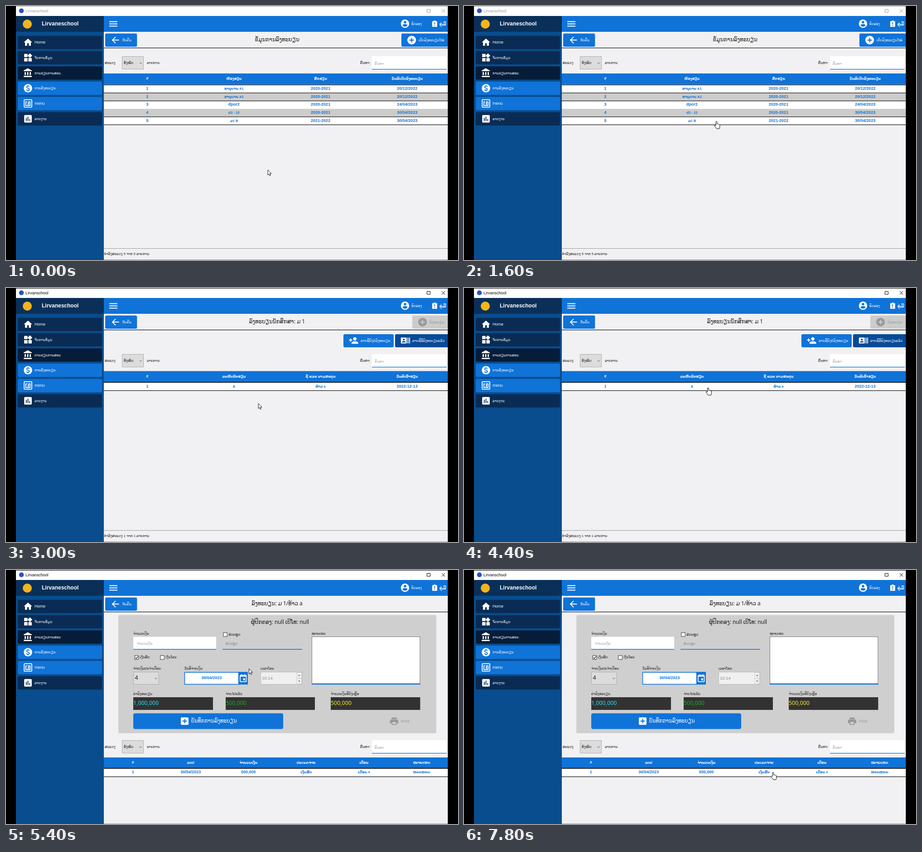
Write an HTML page that moves like this. It is 998 px wide and 561 px high and loops after 8000 ms.

```html
<!DOCTYPE html>
<html lang="lo">
<head>
<meta charset="utf-8">
<title>Lirvanschool</title>
<style>
html, body { margin: 0; width: 100%; height: 100%; overflow: hidden; background: #000; }
svg { display: block; width: 998px; height: 561px; }
text { font-family: "Liberation Sans", "DejaVu Sans", sans-serif; white-space: pre; }
.big { font-family: "Noto Sans", "DejaVu Sans", sans-serif; }
</style>
</head>
<body>
<svg id="stage" viewBox="0 0 998 561"></svg>
<script>
const BLUE = '#1073d8', PAGE = '#f1f1f3', INK = '#1a1a1a', GREY = '#cccccc', HINT = '#a0a0a0';

const rect = (x, y, x2, y2, fill, r = 0, extra = '') =>
  `<rect x="${x}" y="${y}" width="${x2 - x}" height="${y2 - y}" rx="${r}" fill="${fill}" ${extra}/>`;
const frame = (x, y, x2, y2, fill, line, w = 1) =>
  rect(x + w / 2, y + w / 2, x2 - w / 2, y2 - w / 2, fill, 0, `stroke="${line}" stroke-width="${w}"`);
const path = (d, fill, line = 'none', w = 1, extra = '') =>
  `<path d="${d}" fill="${fill}" stroke="${line}" stroke-width="${w}" ${extra}/>`;
const disc = (x, y, r, fill) => `<circle cx="${x}" cy="${y}" r="${r}" fill="${fill}"/>`;
const group = (id, body) => `<g id="${id}">${body}</g>`;
// 24-unit icon centred on x, y
const icon = (x, y, k, body) =>
  `<g transform="translate(${x - 12 * k} ${y - 12 * k}) scale(${k})">${body}</g>`;

const text = (x, y, s, fill = INK, { size, bold, mid, big } = {}) => {
  const lao = /[\u0e80-\u0eff]/.test(s);
  size = size || (big ? (lao ? 11.9 : 12.4) : lao ? 7.5 : 9);
  return `<text x="${x}" y="${y}" font-size="${size}" fill="${fill}"` +
    (bold ? ' font-weight="700"' : '') + (mid ? ' text-anchor="middle"' : '') +
    (big ? ' class="big"' : '') + `>${s}</text>`;
};

const plus = (x, y, r, color) =>
  path(`M${x - r} ${y}h${2 * r}M${x} ${y - r}v${2 * r}`, 'none', color, 2.2);
const chevron = (x, y) => path(`M${x - 2.5} ${y - 1.2}l2.5 2.5l2.5-2.5`, 'none', '#444', 1);

const ICONS = {
  home: path('M10 20v-6h4v6h5v-8h3L12 3 2 12h3v8z', '#fff'),
  widgets: path('M13 13v8h8v-8zM3 21h8v-8H3zM3 3v8h8V3zM16.7 1.7 11 7.3 16.7 13l5.6-5.7z', '#fff'),
  bank: path('M4 10v7h3v-7zm6 0v7h3v-7zM2 22h19v-3H2zm14-12v7h3v-7zM11.5 1 2 6v2h19V6z', '#fff'),
  money: disc(12, 12, 10, '#fff') +
    path('M15.3 8.8Q14.6 7 12 7Q9 7 9 9.3Q9 11.2 12 12Q15.3 12.8 15.3 14.8Q15.3 17 12 17Q9 17 8.7 15M12 4.8V7M12 17v2.2', 'none', BLUE, 1.9),
  nfc: rect(3, 3, 21, 21, 'none', 1.5, 'stroke="#fff" stroke-width="2"') +
    path('M10 8H7v9h10V8h-4v5.5', 'none', '#fff', 2) + disc(13, 13.5, 1.7, '#fff'),
  chart: rect(3, 3, 21, 21, '#fff', 2) + path('M8 17v-7M12 17V7M16 17v-4', 'none', '#0a2c54', 2),
  user: disc(12, 12, 10, '#fff') + disc(12, 8.5, 3, BLUE) +
    path('M6 16Q6.4 13 12 13T18 16Q16 19.2 12 19.2T6 16', BLUE),
  addUser: disc(15, 8, 4, '#fff') + path('M7 20v-2q0-4 8-4t8 4v2z', '#fff') +
    path('M1 11h8M5 7v8', 'none', '#fff', 2.2),
  card: rect(1, 5, 15, 19, '#fff', 1) + disc(8, 9.7, 2.2, '#064a98') +
    path('M3.5 16.5q0-3.2 4.5-3.2t4.5 3.2z', '#064a98') + path('M18 5v14M22 5v14', 'none', '#fff', 2),
  printer: path('M6 3h12v4H6zM5 8h14q3 0 3 3v6h-4v4H6v-4H2v-6q0-3 3-3zm3 6v5h8v-5z', '#999'),
  calendar: rect(4, 4.5, 20, 21, 'none', 1, 'stroke="#fff" stroke-width="2"') +
    path('M4 6.5h16M8 2v4M16 2v4', 'none', '#fff', 3) + rect(12, 12.5, 17, 17.5, '#fff'),
};

const menu = [
  ['home', 'Home', '#0a2c54'], ['widgets', 'ຈັດການຂໍ້ມູນ', '#0a2c54'],
  ['bank', 'ການຮຽນການສອນ', '#061d3a'], ['money', 'ການລົງທະບຽນ', BLUE],
  ['nfc', 'menu', BLUE], ['chart', 'ລາຍງານ', '#0a2c54'],
];

const titleBar = (id, color) => group(id,
  rect(22, 0, 976, 1, color) + text(43, 14, 'Lirvanschool', color) +
  path('M929.5 7.5h7v6.5h-7zM962 7l7.5 7.5M969.5 7l-7.5 7.5', 'none', color, 1));

function shell() {
  let s = rect(22, 0, 976, 22, '#fff') + disc(34, 10.5, 5.3, '#2a50c8') +
    titleBar('idle', '#999') + titleBar('active', '#000') +
    rect(22, 22, 216, 561, '#094d8e') + rect(22, 22, 216, 57, '#0a3059') +
    disc(47, 40, 10, '#f2b51d') + text(79, 42.5, 'Lirvaneschool', '#fff', { size: 12, bold: true });
  menu.forEach(([name, label, fill], i) => {
    const y = 80.5 + i * 33.75;
    s += rect(26, y - 14.7, 212, y + 14.7, fill, 3) + icon(48.5, y - .2, .93, ICONS[name]) +
      text(63, y + 2.5, label, '#fff');
  });
  return s + rect(216, 22, 976, 57, BLUE) +
    path('M228 34.5h18M228 39.5h18M228 44.5h18', 'none', '#fff', 2) +
    icon(881, 39, .92, ICONS.user) + text(895, 41.5, 'ທົດລອງ', '#fff') +
    rect(941, 33.5, 952, 46, '#fff', 1) + rect(944.5, 32, 948.5, 35, '#fff', 1) +
    path('M946.5 36v4.5M946.5 42v2', 'none', BLUE, 1.7) +
    text(957, 42.5, 'ຄູ່ມື', '#fff', { size: 9.5, bold: true });
}

const heading = title => rect(216, 57, 976, 561, PAGE) +
  rect(216, 92, 976, 93.2, '#111') + rect(219, 60.7, 289.3, 90, BLUE, 3) +
  path('M249.5 75.3H235.5M242 68.3l-7 7l7 7', 'none', '#fff', 1.9) +
  text(257, 77.5, 'ກັບຄືນ', '#fff') +
  text(598.5, 78, title, INK, { big: true, mid: true });

const corner = (x, label, fill, fg) => rect(x, 60.7, 982, 90, fill, 3) +
  disc(x + 22.7, 75.3, 9.6, fg) + plus(x + 22.7, 75.3, 5, fill) + text(x + 38, 77.5, label, fg);

const filters = y => text(218, y + 17, 'ສະແດງ') + frame(256, y, 304, y + 29, '#dcdcdc', '#adadad') +
  text(260, y + 17, 'ທັງໝົດ') + chevron(297.3, y + 15) + text(311, y + 17, 'ລາຍການ') +
  text(782, y + 17, 'ຄົ້ນຫາ:') + rect(808, y, 973, y + 29, '#fff') +
  rect(808, y + 28, 973, y + 29.3, BLUE) + text(814, y + 18.5, 'ຄົ້ນຫາ', HINT);

const cells = (y, list, fill) => list.map((s, i) =>
  text(216.5 + 765 * (i + .5) / list.length, y, s, fill, { bold: true, mid: true })).join('');
const head = (y, list) => rect(216, y, 976, y + 24.5, BLUE) + cells(y + 14.2, list, '#fff');
const row = (y, list, bg, fg) => rect(216, y, 976, y + 17.6, bg) + cells(y + 10.8, list, fg);
const rule = (y, w = 1.2) => rect(216, y - w / 2, 976, y + w / 2, '#111');
const status = n => rect(216, 535, 976, 536, '#999') + rect(216, 560, 976, 561, '#999') +
  text(216.5, 550, `ກຳລັງສະແດງ ${n} ຈາກ ${n} ລາຍການ`);

function classPage() {
  const rows = [
    ['ອານຸບານ A1', '2020-2021', '20/12/2022'], ['ອານຸບານ A2', '2020-2021', '20/12/2022'],
    ['dpor2', '2020-2021', '24/04/2023'], ['ປ2 - 22', '2020-2021', '30/04/2023'],
    ['ມ1 B', '2021-2022', '30/04/2023'],
  ].map((r, i) => [String(i + 1), ...r]);
  const top = i => 174.4 + i * 17.6;
  return heading('ຂໍ້ມູນການລົງທະບຽນ') + corner(873, 'ເປີດລົງທະບຽນໃໝ່', BLUE, '#fff') + filters(111) +
    head(149, ['#', 'ຫ້ອງຮຽນ', 'ສົກຮຽນ', 'ວັນທີເປີດລົງທະບຽນ']) +
    rows.map((r, i) => row(top(i), r, i % 2 ? GREY : '#fff', BLUE)).join('') +
    group('pickClass', row(top(4), rows[4], BLUE, '#fff')) +
    [0, 1, 2, 4, 5].map(i => rule(top(i))).join('') + status(5);
}

function studentPage() {
  const student = ['1', 'a', 'ທ້າວ a', '2022-12-13'];
  return heading('ລົງທະບຽນນັກສຶກສາ: ມ 1') + corner(897, 'ລົງທະບຽນ', GREY, '#999') +
    rect(745, 102, 856, 131, BLUE, 3) + icon(767.5, 116, .92, ICONS.addUser) +
    text(783, 118.5, 'ລາຍຊື່ຍັງບໍ່ລົງທະບຽນ', '#fff') +
    rect(859, 102, 982, 131, '#064a98', 3) + icon(882, 116, .92, ICONS.card) +
    text(897, 118.5, 'ລາຍຊື່ທີ່ລົງທະບຽນແລ້ວ', '#fff') + filters(146) +
    head(183.5, ['#', 'ລະຫັດນັກຮຽນ', 'ຊື່ ແລະ ນາມສະກຸນ', 'ວັນທີເຂົ້າຮຽນ']) +
    row(208.8, student, '#fff', BLUE) +
    group('pickStudent', row(208.8, student, BLUE, '#fff') + corner(897, 'ລົງທະບຽນ', BLUE, '#fff')) +
    rule(208.3, 1.8) + rule(226.6) + status(1);
}

const check = (x, y, label, on) => frame(x, y, x + 9.5, y + 9.5, '#fff', '#333') +
  (on ? path(`M${x + 2} ${y + 4.8}l2 2.2l3.8-4.5`, 'none', '#222', 1.2) : '') +
  text(x + 12, y + 6.8, label);
const total = (x, x2, label, sum, color) => text(x, 275.5, label) +
  rect(x, 281, x2, 309, '#323233') + text(x, 298.3, sum, color, { big: true });

function payPage() {
  return heading('ລົງທະບຽນ: ມ 1/ທ້າວ a') + rect(248, 99.5, 950, 360.5, '#cfcfcf', 3) +
    text(605, 118.5, 'ຜູ້ປົກຄອງ: null ເບີໂທ: null', INK, { big: true, mid: true }) +
    text(281, 142.5, 'ຈຳນວນເງິນ') + rect(281, 147.5, 464, 176, '#fff') + rect(281, 174.5, 464, 176, BLUE) +
    text(289, 165, 'ຈຳນວນເງິນ', HINT) +
    check(479.3, 137.8, 'ສ່ວນຫຼຸດ') + rect(478, 174.5, 654, 176, BLUE) + text(485, 165, 'ສ່ວນຫຼຸດ', '#888') +
    text(675, 142.5, 'ໝາຍເຫດ') + frame(675, 147, 914.5, 253, '#fff', '#777') + rect(675, 250.5, 914.5, 253, BLUE) +
    check(283.8, 188.5, 'ເງິນສົດ', true) + check(340.3, 188.5, 'ເງິນໂອນ') +
    text(281, 219.5, 'ຈ່າຍເງິນປະຈຳເດືອນ') + frame(281, 225, 337.5, 253, '#dcdcdc', '#adadad') +
    text(284.5, 242, '4', INK, { big: true }) + chevron(331, 239.5) +
    text(394, 219.5, 'ວັນທີຈ່າຍເງິນ') + frame(393.7, 225.2, 515, 253.2, '#fff', BLUE, 1.6) +
    text(454, 241, '30/04/2023', BLUE, { bold: true, mid: true }) +
    rect(513, 225, 534, 253, BLUE) + icon(523.7, 239, .85, ICONS.calendar) +
    text(562, 219.5, 'ເວລາໂອນ') + frame(562, 225, 654, 253, '#f0f0f0', '#bdbdbd') +
    text(565, 241.5, '10:14', '#888', { size: 9.5 }) +
    frame(641.5, 226, 653, 239.5, '#f0f0f0', '#d0d0d0') + frame(641.5, 239.5, 653, 252, '#f0f0f0', '#d0d0d0') +
    path('M645 234h4.6l-2.3-2.6zM645 244.5h4.6l-2.3 2.6z', '#555') +
    total(281, 457, 'ຄ່າລົງທະບຽນ', '1,000,000', '#25dff0') +
    total(485, 682, 'ຈ່າຍໄປແລ້ວ', '500,000', '#1fae1f') +
    total(717, 914.5, 'ຈຳນວນເງິນທີ່ຍັງເຫຼືອ', '500,000', '#f5ea28') +
    rect(281, 316.5, 612, 351.2, BLUE, 4) + rect(386, 325.5, 403, 342, '#fff', 2) + plus(394.5, 333.7, 4.8, BLUE) +
    text(409, 337, 'ບັນທຶກການລົງທະບຽນ', '#fff', { big: true, size: 11.4 }) +
    icon(857, 334, .92, ICONS.printer) + text(872, 336.5, 'Print', '#999') + filters(376) +
    head(414, ['#', 'ວດປ', 'ຈຳນວນເງິນ', 'ປະເພດຈ່າຍ', 'ເດືອນ', 'ໝາຍເຫດ']) +
    row(438.6, ['1', '30/04/2023', '500,000', 'ເງິນສົດ', 'ເດືອນ 4', 'ຫກດຫກດ'], '#fff', BLUE) +
    rule(438, 1.8) + rule(456.6) + rect(216, 560, 976, 561, '#999');
}

const ARROW = 'M0 0V11.3L2.6 8.9L4.4 13L6.2 12.2L4.5 8.2H8Z';
const HAND = 'M-1.4 9V1.2a1.4 1.4 0 0 1 2.8 0V6a1.2 1 0 0 1 2.3.3a1.2 1 0 0 1 2.1.5a1 1 0 0 1 1.6.8V11.5' +
  'Q7.4 13.5 6.3 16H.4Q-1.2 13.5-4.6 9.6Q-4.6 7.6-2.8 8.2Z';

const $ = id => document.getElementById(id);
$('stage').innerHTML = shell() + group('classes', classPage()) + group('students', studentPage()) +
  group('payment', payPage()) + rect(0, 0, 22, 561, '#000') + rect(975.5, 0, 998, 561, '#000') +
  group('pointer', path(ARROW, '#fff', '#000', .9, 'id="arrow"') + path(HAND, '#fff', '#000', 1, 'id="hand"'));

// time, x, y of the pointer
const track = [
  [0, 578, 362], [1200, 557.5, 255], [3400, 557, 255], [4600, 537.5, 218], [5200, 537.5, 218],
  [5400, 536.5, 218], [6400, 590, 290], [7000, 732, 448], [7400, 700, 450], [7600, 682.5, 447],
];

function pointerAt(t) {
  const i = track.findIndex(p => p[0] > t);
  if (i < 0) return track[track.length - 1].slice(1);
  const [a, b] = [track[i - 1], track[i]];
  const u = (t - a[0]) / (b[0] - a[0]), e = u * u * (3 - 2 * u);
  return [a[1] + (b[1] - a[1]) * e, a[2] + (b[2] - a[2]) * e];
}

const show = (id, on) => $(id).setAttribute('display', on ? 'inline' : 'none');

function draw() {
  const t = Math.floor(performance.now() % 8000 / 200) * 200;
  const [x, y] = pointerAt(t);
  const page = t < 3000 ? 'classes' : t < 5400 ? 'students' : 'payment';
  ['classes', 'students', 'payment'].forEach(p => show(p, p === page));
  show('idle', t < 2600);
  show('active', t >= 2600);
  show('pickClass', t >= 2600 && t < 3000);
  show('pickStudent', t >= 4600 && t < 5400);
  const overRow = page === 'classes' ? y < 262 && t < 2800
    : page === 'students' ? y < 226 : y > 438 && y < 456;
  show('hand', overRow);
  show('arrow', !overRow);
  $('pointer').setAttribute('transform', `translate(${x} ${y})`);
  requestAnimationFrame(draw);
}
draw();
</script>
</body>
</html>
```
